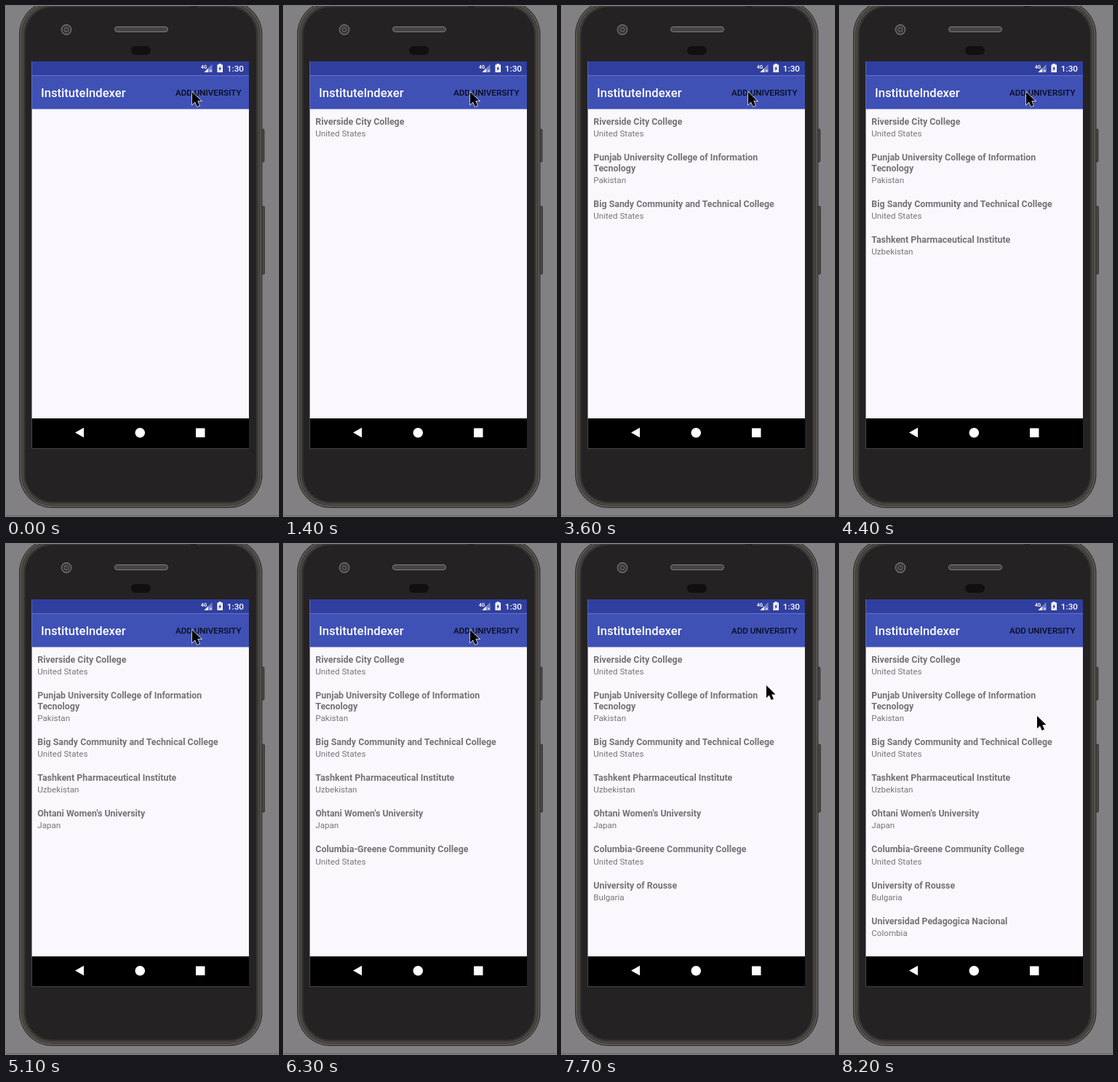
Animation, 374 px wide and 700 px high, one loop 8300 ms. Source, as an HTML page:

```html
<!DOCTYPE html>
<html lang="en">
<head>
<meta charset="utf-8">
<title>InstituteIndexer</title>
<style>
  html, body { margin: 0; width: 100%; height: 100%; overflow: hidden; background: #838083; }
  svg { display: block; width: 374px; height: 700px; font-family: Roboto, sans-serif; }
  .name { font-size: 12.4px; font-weight: 700; fill: #747275; }
  .country { font-size: 11.62px; fill: #777578; }
</style>
</head>
<body>
<svg viewBox="0 0 374 700">
  <rect y="699" width="374" height="1" fill="#686568"/>

  <!-- phone body and side buttons -->
  <g fill="#4b4846" stroke="#2d2b2a" stroke-width=".8">
    <rect x="351" y="169" width="4" height="45" rx="1"/>
    <rect x="351" y="275" width="4.5" height="93" rx="1"/>
  </g>
  <g id="shell"></g>
  <rect x="253" y="0" width="9" height="3" fill="#252223"/>

  <circle cx="83" cy="32.5" r="6.5" fill="#2b292a" stroke="#6b6869" stroke-width="1.8"/>
  <circle cx="83" cy="32.5" r="3.2" fill="#3b393b" stroke="#777476"/>
  <rect x="149.5" y="28.5" width="73" height="7" rx="3.5" fill="#474445" stroke="#807d7e"/>
  <rect x="172" y="55" width="27" height="12" rx="6" fill="#110f10"/>

  <!-- screen -->
  <rect x="35.5" y="76" width="298.5" height="531.5" fill="#faf8fc"/>
  <rect x="35.5" y="76" width="298.5" height="19.5" fill="#303f9f"/>
  <rect x="35.5" y="95.5" width="298.5" height="46" fill="#3f51b5"/>
  <rect x="35.5" y="566" width="298.5" height="41.5"/>

  <!-- status icons -->
  <g fill="#fff">
    <text x="268" y="85.5" font-size="6.5" font-weight="700">4G</text>
    <path d="M283.5 80V91H272.5Z" opacity=".35"/>
    <path d="M278 85.5V91H272.5Z"/>
    <path d="M280 87.5l3 3m0-3l-3 3" stroke="#fff" stroke-width="1"/>
    <path d="M290.5 80.5H292.5V79.3H295.7V80.5H298V91H290.5Z"/>
    <path d="M295 82L292 86.4H293.8L293.2 89.8L296.4 85.2H294.5Z" fill="#303f9f"/>
    <text x="303.8" y="90" font-size="11.8" font-weight="500">1:30</text>
    <text x="48" y="125" font-size="16.6" font-weight="500">InstituteIndexer</text>
  </g>
  <text x="323.5" y="122.7" text-anchor="end" font-size="11.62" font-weight="500" fill="#090c1b">ADD UNIVERSITY</text>

  <g fill="#fff">
    <path d="M95 585.5L107 578.7V592.3Z"/>
    <circle cx="184.3" cy="585.7" r="6.8"/>
    <rect x="261" y="579.5" width="12.5" height="12.5" rx=".6"/>
  </g>

  <g id="list"></g>
  <path id="cursor" d="M0 0V17.2L3.9 13.5L6.7 20L10 18.6L7.3 12.3H12.6Z"
        stroke="#fff" stroke-width="1.3" paint-order="stroke"/>
</svg>

<script>
const LOOP = 8300;
const universities = [
  { at: 500, lines: ["Riverside City College"], country: "United States" },
  { at: 2200, lines: ["Punjab University College of Information", "Tecnology"], country: "Pakistan" },
  { at: 3200, lines: ["Big Sandy Community and Technical College"], country: "United States" },
  { at: 4000, lines: ["Tashkent Pharmaceutical Institute"], country: "Uzbekistan" },
  { at: 4800, lines: ["Ohtani Women's University"], country: "Japan" },
  { at: 5700, lines: ["Columbia-Greene Community College"], country: "United States" },
  { at: 6500, lines: ["University of Rousse"], country: "Bulgaria" },
  { at: 7900, lines: ["Universidad Pedagogica Nacional"], country: "Colombia" },
];
// Pointer keys: time, x, y
const pointer = [
  [0, 256, 118], [6800, 256, 118], [7200, 285, 126],
  [7700, 281, 194], [8200, 271, 236], [LOOP, 271, 236],
];

function add(parent, tag, attributes, text = "") {
  const node = document.createElementNS("http://www.w3.org/2000/svg", tag);
  for (const key in attributes) node.setAttribute(key, attributes[key]);
  node.textContent = text;
  return parent.appendChild(node);
}

// Nested rounded outlines: inset, colour
const shell = document.getElementById("shell");
for (const [inset, fill] of [[0, "#302e2d"], [1.2, "#5e5b58"], [3, "#3b3836"],
                             [4.6, "#58544f"], [5.8, "#383533"], [8.5, "#252223"]]) {
  add(shell, "rect", {
    x: 18 + inset, y: -7 + inset, width: 334.5 - 2 * inset, height: 696 - 2 * inset,
    rx: 46 - inset, fill,
  });
}

const list = document.getElementById("list");
let baseline = 163;
for (const entry of universities) {
  entry.node = add(list, "g", {});
  entry.lines.forEach((line, i) =>
    add(entry.node, "text", { class: "name", x: 43.3, y: baseline + i * 14.6 }, line));
  const extra = (entry.lines.length - 1) * 14.6;
  add(entry.node, "text", { class: "country", x: 43.3, y: baseline + extra + 16.2 }, entry.country);
  baseline += extra + 49.15;
}

const cursor = document.getElementById("cursor");
function draw(now) {
  const time = now % LOOP;
  for (const { node, at } of universities)
    node.setAttribute("visibility", time >= at ? "visible" : "hidden");

  const next = pointer.findIndex(key => key[0] > time);
  const [t0, x0, y0] = pointer[next - 1];
  const [t1, x1, y1] = pointer[next];
  const part = (time - t0) / (t1 - t0);
  cursor.setAttribute("transform", `translate(${x0 + (x1 - x0) * part} ${y0 + (y1 - y0) * part})`);
}

const start = performance.now();
function tick() {
  draw(performance.now() - start);
  requestAnimationFrame(tick);
}
tick();
</script>
</body>
</html>
```
